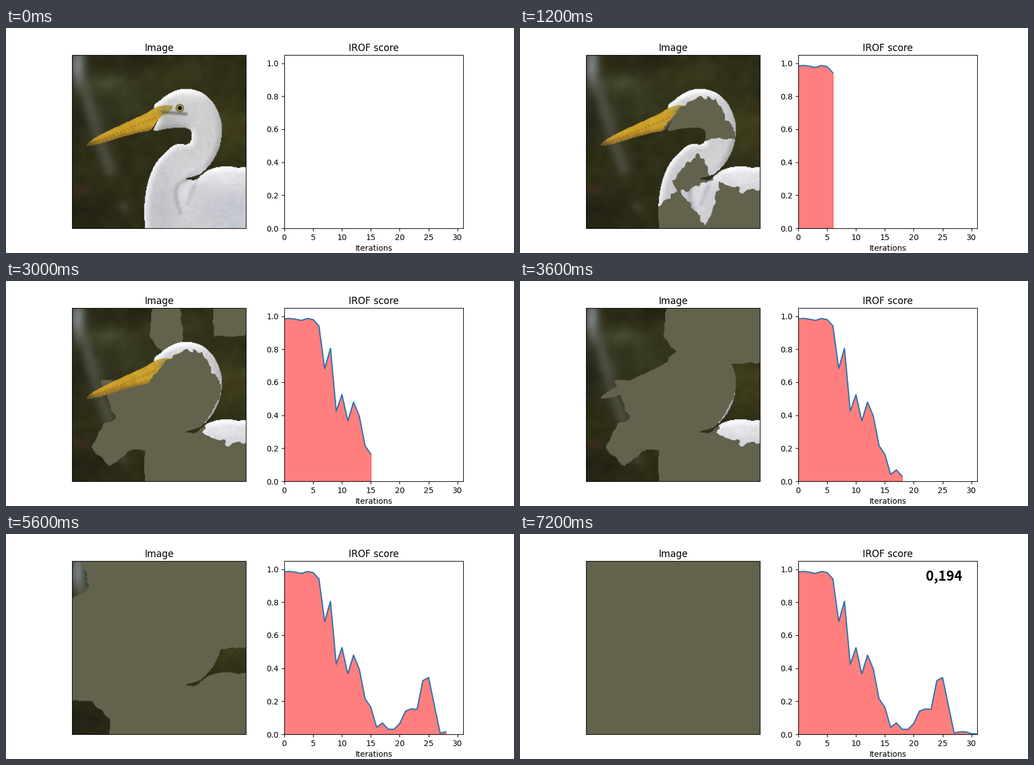
Write a matplotlib script that moves like this. It is 900x400 px and loops after 8.2 s.

```python
import numpy as np
import matplotlib.pyplot as plt
from matplotlib.animation import FuncAnimation
from matplotlib.path import Path

N, LAST, FRAMES = 224, 31, 41
LEFT, TOP, SIDE = 117, 48, 308
MEAN = (99, 98, 77)
rng = np.random.default_rng(4)

# Pixel centres of the picture, in stage coordinates
grid = (np.arange(N) + 0.5) * SIDE / N
X, Y = np.meshgrid(LEFT + grid, TOP + grid)


def blur(a, size):
    kernel = np.ones(size) / size
    a = np.pad(a, size // 2, mode="edge")
    for axis in (0, 1):
        a = np.apply_along_axis(np.convolve, axis, a, kernel, "valid")
    return a


def noise(size):
    a = blur(blur(rng.normal(size=(N, N)), size), size)
    return a / a.std()


def smooth(points, closed=True):
    """Catmull-Rom curve through the points."""
    p = np.array(points, float)
    p = np.vstack([p[-1], p, p[:2]] if closed else [p[0], p, p[-1]])
    t = np.linspace(0, 1, 10, endpoint=False)[:, None]
    return np.vstack([
        b + 0.5 * t * (c - a + t * (2 * a - 5 * b + 4 * c - d + t * (3 * (b - c) + d - a)))
        for a, b, c, d in zip(p, p[1:], p[2:], p[3:])])


def inside(points):
    return Path(smooth(points)).contains_points(np.c_[X.ravel(), Y.ravel()]).reshape(N, N)


def mix(img, weight, color):
    img += weight[..., None] * (np.array(color) - img)


def blob(img, x, y, rx, ry, color, strength=0.8):
    mix(img, strength * np.exp(-((X - x) / rx) ** 2 - ((Y - y) / ry) ** 2), color)


def stroke(img, points, width, color, strength):
    d2 = np.min([(X - x) ** 2 + (Y - y) ** 2 for x, y in smooth(points, closed=False)], axis=0)
    mix(img, strength * np.exp(-d2 / width ** 2), color)


bird = inside([
    (262, 140), (275, 127), (290, 116), (305, 110), (322, 108), (340, 112),
    (356, 121), (369, 136), (378, 155), (383, 178), (380, 205), (374, 222),
    (365, 238), (352, 253), (341, 261), (319, 268), (328, 270), (338, 269),
    (348, 260), (362, 251), (385, 246), (408, 248), (440, 260), (440, 375),
    (248, 378), (248, 372), (245, 325), (250, 280), (264, 243), (285, 219),
    (297, 209), (308, 206), (320, 207), (327, 202), (329, 190), (325, 180),
    (310, 177), (285, 179), (262, 182), (270, 160)])
beak = inside([
    (143, 209), (152, 199), (175, 186), (200, 174), (245, 153), (262, 143),
    (278, 138), (295, 139), (288, 150), (272, 160), (256, 181), (235, 186),
    (205, 194), (175, 203), (155, 208)])


def paint_water():
    img = np.tile(np.array([46., 46, 24]), (N, N, 1))
    blob(img, 240, 58, 60, 22, (36, 35, 21))
    blob(img, 215, 140, 60, 40, (57, 59, 35))
    blob(img, 300, 90, 60, 30, (60, 58, 29))
    blob(img, 398, 180, 45, 55, (70, 68, 31))
    blob(img, 140, 330, 60, 40, (35, 34, 20))
    blob(img, 125, 165, 22, 45, (38, 38, 25))
    blob(img, 178, 100, 42, 18, (68, 77, 46))
    stroke(img, [(122, 40), (136, 95), (160, 180), (184, 255)], 14, (102, 104, 96), 0.5)
    blob(img, 127, 66, 11, 32, (136, 144, 152), 0.75)
    blob(img, 130, 288, 16, 9, (66, 50, 36))
    blob(img, 209, 318, 12, 10, (72, 60, 44), 0.7)
    return img + 2 * noise(9)[..., None]


def paint_bird():
    img = np.tile(np.array([207., 207, 210]), (N, N, 1))
    blob(img, 325, 112, 50, 16, (234, 234, 236))
    blob(img, 288, 164, 28, 16, (180, 180, 180))
    blob(img, 275, 325, 26, 55, (190, 191, 198))
    blob(img, 388, 262, 60, 26, (236, 236, 240))
    blob(img, 400, 322, 60, 32, (196, 198, 209))
    blob(img, 320, 298, 14, 26, (224, 224, 232))
    stroke(img, [(322, 268), (304, 280), (301, 300), (309, 330)], 4, (160, 161, 168), 0.6)
    stroke(img, [(338, 270), (330, 290), (322, 312)], 5, (178, 179, 190), 0.6)
    blob(img, 408, 354, 24, 9, (192, 201, 206))
    # Light falls from the upper left on rounded edges
    gy, gx = np.gradient(blur(blur(bird.astype(float), 9), 9))
    return img + (300 * (gx + gy) + 2 * noise(3))[..., None]


def paint_beak():
    img = np.tile(np.array([204., 160, 44]), (N, N, 1))
    stroke(img, [(146, 209), (205, 193), (260, 181)], 6, (122, 92, 34), 0.7)
    stroke(img, [(150, 206), (210, 182), (268, 158)], 2, (150, 106, 22), 0.6)
    blob(img, 145, 207, 12, 7, (88, 70, 45))
    blob(img, 286, 147, 16, 9, (146, 148, 104))
    return img + 3 * noise(5)[..., None]


def paint_photo():
    img = paint_water()
    for shape, layer in ((bird, paint_bird()), (beak, paint_beak())):
        img[shape] = layer[shape]
    stroke(img, [(278, 150), (298, 151), (320, 153)], 3, (92, 92, 70), 0.7)
    radius = np.hypot(X - 308, Y - 142.5)
    for size, color in ((8, (112, 110, 74)), (6, (180, 168, 70)), (4.2, (20, 20, 18))):
        mix(img, np.clip(size - radius, 0, 1), color)
    return np.clip(img, 0, 255)


# Seed points of the segments, keyed by the iteration that removes them
plumage_seeds = {
    1: [(283, 163), (310, 150)], 2: [(350, 162)], 3: [(305, 258)], 4: [(280, 330)],
    5: [(366, 314)], 6: [(408, 325)], 7: [(352, 230)], 8: [(280, 235)],
    12: [(236, 285)], 15: [(324, 300)], 16: [(290, 112), (335, 92), (377, 147)],
    17: [(264, 146), (200, 180)], 28: [(374, 240), (400, 255)]}
water_seeds = {
    9: [(300, 205)], 10: [(190, 208), (225, 205)], 11: [(397, 70)],
    13: [(235, 265), (190, 285)], 14: [(285, 75)], 18: [(338, 72), (398, 125)],
    19: [(230, 70)], 20: [(225, 125), (190, 145), (175, 122)], 21: [(172, 215)],
    22: [(229, 334)], 23: [(168, 60)], 24: [(147, 140)], 25: [(125, 150)],
    26: [(138, 234), (139, 258)], 27: [(400, 168)], 29: [(112, 75)],
    30: [(402, 238), (330, 268)], 31: [(139, 334)]}


def nearest(seeds, wobble):
    """Rank of the closest seed, with ragged borders."""
    x, y = X + wobble * noise(5), Y + wobble * noise(5)
    flat = [(rank, *point) for rank, points in seeds.items() for point in points]
    closest = np.argmin([(x - px) ** 2 + (y - py) ** 2 for _, px, py in flat], axis=0)
    return np.array([rank for rank, *_ in flat])[closest]


photo = paint_photo().astype(np.uint8)
rank = np.where(bird | beak, nearest(plumage_seeds, 1.8), nearest(water_seeds, 0.8))
scores = np.array([
    .985, .987, .982, .975, .987, .980, .942, .683, .806, .425, .525,
    .366, .480, .395, .215, .164, .042, .069, .031, .030, .065, .140,
    .154, .151, .325, .344, .175, .008, .015, .015, .004, .001])
steps = np.arange(LAST + 1)

fig, (ax_image, ax_score) = plt.subplots(1, 2, figsize=(9, 4), dpi=100)
ax_image.set_title("Image", pad=5.28)
ax_image.set_xticks([])
ax_image.set_yticks([])
picture = ax_image.imshow(photo)

ax_score.set_title("IROF score", pad=5.28)
ax_score.set_xlabel("Iterations")
area = ax_score.fill_between(steps, scores, color="red", alpha=0.5)
line, = ax_score.plot([], [])
ax_score.set_xlim(0, LAST)
ax_score.set_ylim(0, 1.05)
total = fig.text(751.5 / 900, 1 - 83 / 400, "0,194", family="Noto Sans CJK JP",
                 weight="bold", size=17.3, ha="center", va="baseline")


def update(frame):
    k = min(frame, LAST)
    picture.set_data(np.where((rank <= k)[..., None], MEAN, photo).astype(np.uint8))
    x, y = steps[:k + 1], scores[:k + 1]
    line.set_data(x, y)
    area.set_verts([[(0, 0), *zip(x, y), (k, 0)]])
    total.set_visible(frame > LAST)
    return picture, line, area, total


anim = FuncAnimation(fig, update, frames=FRAMES, interval=200, repeat=True, repeat_delay=0)
plt.show()
```
